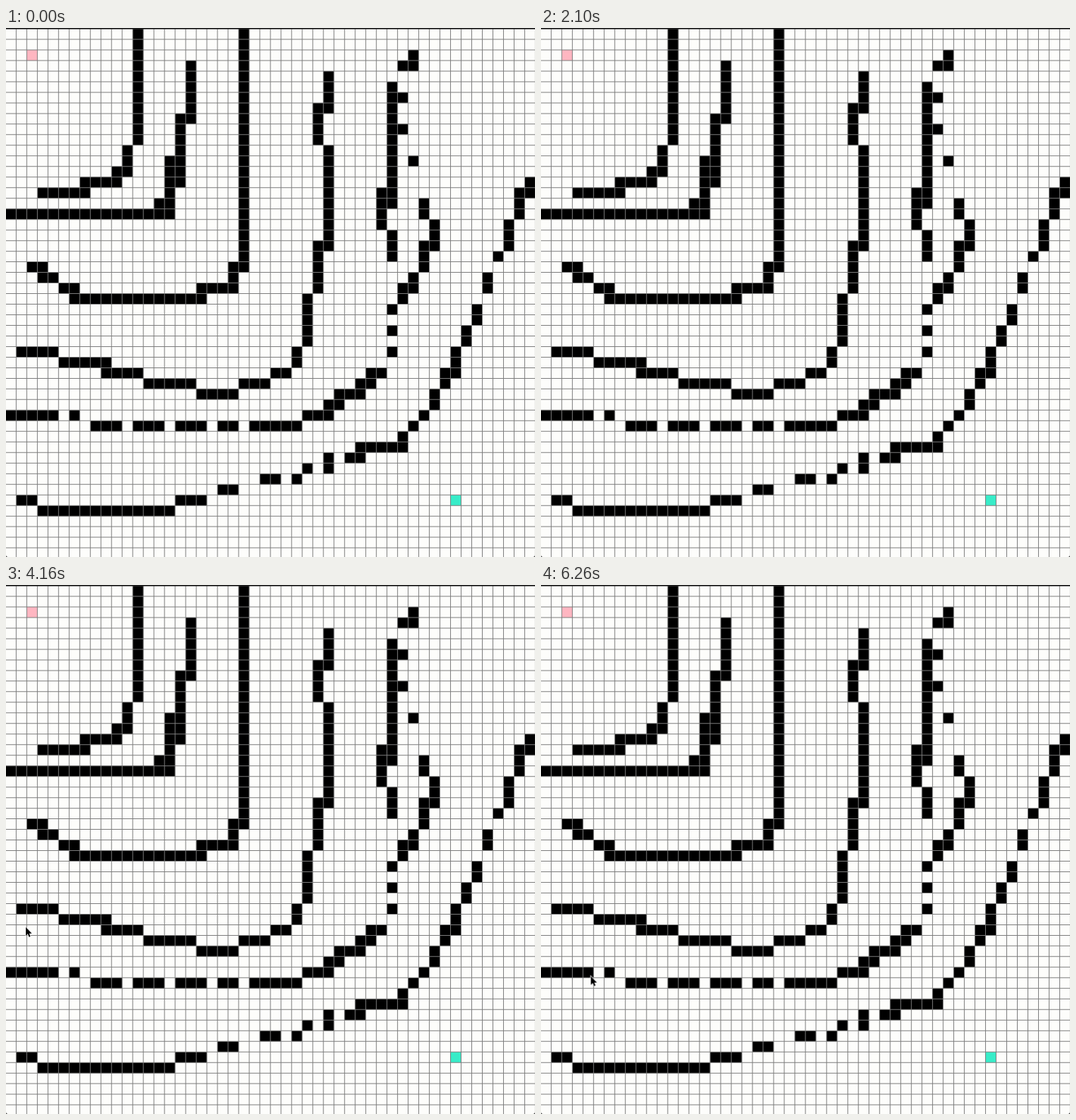
Recreate the animation shown at these times as an HTML page. Size 748 by 748 pixels, loop 8000 ms.

```html
<!DOCTYPE html>
<html lang="en">
<head>
<meta charset="utf-8">
<title>Grid maze</title>
<style>
  html, body { margin: 0; width: 100%; height: 100%; overflow: hidden; background: #fdfdfb; }
  svg { display: block; width: 100vw; height: 100vh; }
  .walls { fill: none; stroke: #000; stroke-width: 1; stroke-linecap: square; }
  .grid { fill: none; stroke: #7c7c7c; stroke-width: 760; stroke-dasharray: 1 13.98; }
  .cursor { animation: wander 8s linear infinite; }

  @keyframes wander {
    0%, 1.25% { transform: translate(330px, 752px); }
    3.75%, 8.25% {
      transform: translate(321px, 743px);
      animation-timing-function: cubic-bezier(.4, .25, .8, .8);
    }
    15.25% {
      transform: translate(105px, 721px);
      animation-timing-function: cubic-bezier(.2, .4, .5, 1);
    }
    17.5%, 25.5% { transform: translate(30px, 709.5px); }
    26.25% { transform: translate(-16px, 674px); }
    26.3%, 48.25% { transform: translate(-16px, 500px); }
    48.5% {
      transform: translate(-4px, 496px);
      animation-timing-function: ease-out;
    }
    54% { transform: translate(35px, 481px); }
    57.5%, 58.75% { transform: translate(32px, 485px); }
    61% { transform: translate(36px, 487px); }
    64.5%, 71.5% {
      transform: translate(29px, 485px);
      animation-timing-function: ease-in;
    }
    78.25% { transform: translate(-16px, 487px); }
    78.3%, 100% { transform: translate(330px, 752px); }
  }
</style>
</head>
<body>
<svg viewBox="0 0 748 748">
  <rect width="748" height="748" fill="#fdfdfb"/>

  <!-- one unit is one cell, whole coordinates are cell centres -->
  <g transform="translate(-.6 1.05) scale(14.98) translate(.5 .5)">
    <g class="walls">
      <path d="M12 0v10m-1 1v2h-1v1h-3v1h-4"/>
      <path d="M17 3v5h-1v6m-1-2v5H0M14 16h0"/>
      <path d="M22 0v22h-1v2h-3v1H6v-1h-1m-1-1h-1v-1h-1"/>
      <path d="M30 4v3h-1v3m1 1v9h-1v4m-1 1v4m-1 1v1m-1 1h-1m-1 1h-2m-1 1h-3m-1-1h-4m-1-1h-3v-1h-4m-1-1h-3"/>
      <path d="M0 36h4m2 0h0m2 1h2m2 0h2m2 0h2m2 0h1m2 0h4m1-1h2v-1h1v-1h2v-1h1v-1h1"/>
      <path d="M36 30h0m0-2h0m0-2h0m1-1v-1h1v-1m1-1v-2h1v-2m-1-1v-1"/>
      <path d="M38 2v1h-1m-1 2v11m-1-1v3m1 1v2M37 6h0m0 3h0m1 3h0"/>
      <path d="M49 14v1h-1v2m-1 1v2m-1 1h0m-1 2v1m-1 2v1m-1 1v1m-1 1v2h-1v1m-1 1v1m-1 1h0m-1 1h0m-1 1v1h-4v1h-1"/>
      <path d="M30 40v1m-2 0h0m-1 1h0m-2 0h-1m-3 1h-1m-2 1h-2m-1 1H3m-1-1h-1"/>
    </g>
    <rect x="1.5" y="1.5" width="1" height="1" fill="#ffb6c1"/>
    <rect x="41.5" y="43.5" width="1" height="1" fill="#38ecc8"/>
  </g>

  <!-- each dash of the wide strokes is one grid line -->
  <path class="grid" d="M-1.1 374H760"/>
  <path class="grid" d="M374 .55V760"/>
  <rect width="748" height="1.5" fill="#111"/>
  <path d="M0 745q0 3 3 3H0zM748 745q0 3-3 3h3z" fill="#222"/>

  <g class="cursor">
    <path d="M0 0V12.2l2.8-2.6 1.8 4.3 2-.9-1.8-4.1H8.6z" fill="#000" stroke="#fff" stroke-width="1.4" paint-order="stroke"/>
  </g>
</svg>
</body>
</html>
```
